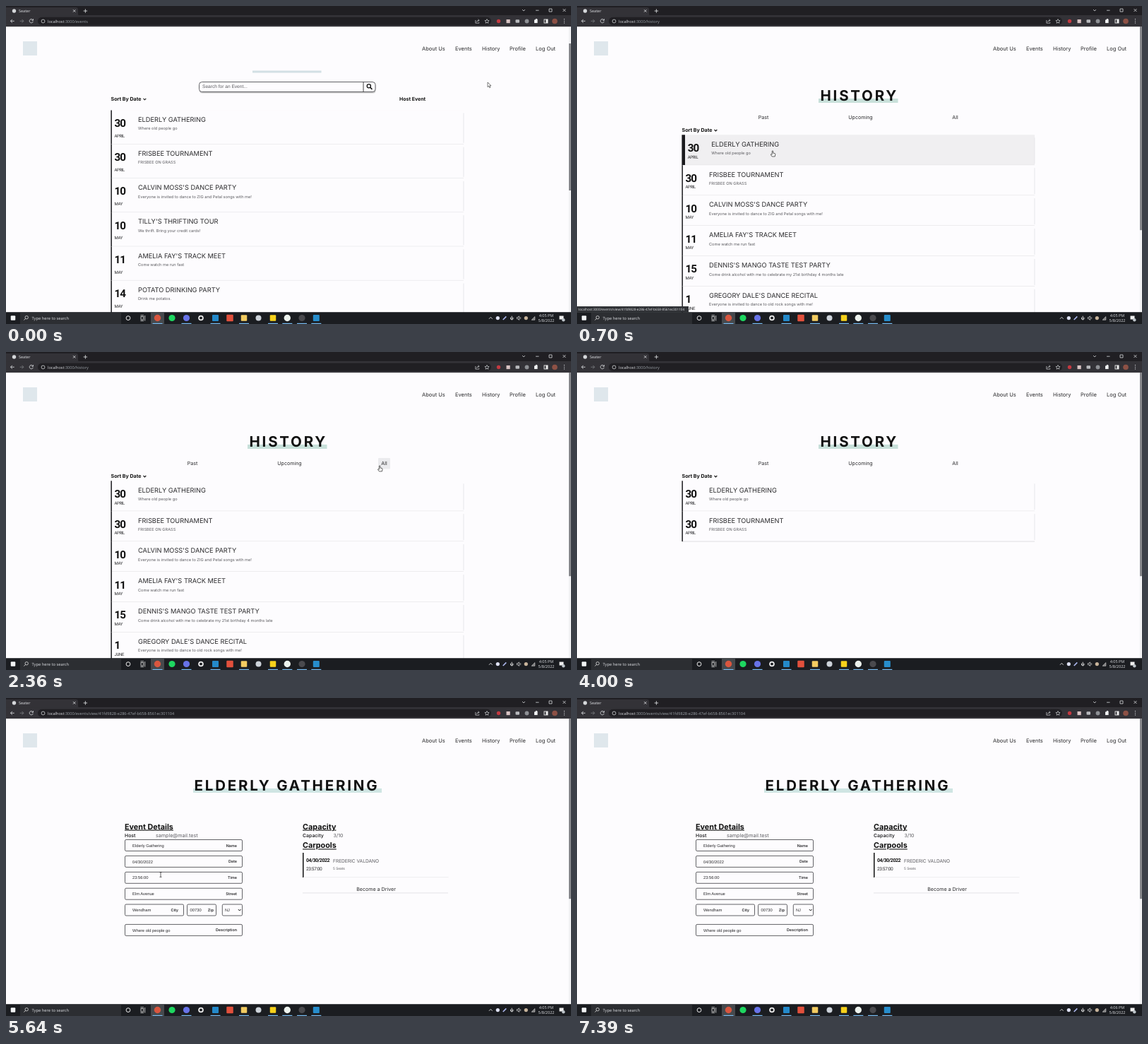
Recreate the animation shown at these times as an HTML page. Size 800 px wide and 450 px high, loop 7510 ms.

```html
<!DOCTYPE html>
<html lang="en">
<head>
<meta charset="utf-8">
<title>Seater</title>
<style>
  html, body { margin: 0; width: 100%; height: 100%; overflow: hidden; background: #fdfcfe; }
  svg { display: block; width: 800px; height: 450px; }
  text { font-family: Inter, sans-serif; fill: #2a2a2c; text-rendering: geometricPrecision; white-space: pre; }
  .bold { font-weight: 700; fill: #111; }
  .semi { font-weight: 600; }
  .soft { fill: #5c5c60; }
  .head { font-weight: 700; fill: #111; letter-spacing: 2.8px; }
  .line { font-weight: 700; fill: #111; text-decoration: underline; }
  .narrow { font-family: Roboto, sans-serif; letter-spacing: -.06em; }
  .form { font-family: "Liberation Sans", sans-serif; }
  .ui { font-family: "Open Sans", sans-serif; fill: #dfe1e5; }
  .end { text-anchor: end; }
  .mid { text-anchor: middle; }
</style>
</head>
<body>
<svg viewBox="0 0 800 450">
  <g id="page"></g>
  <g id="frame"></g>
  <g id="live"></g>
  <g id="cursor"></g>
</svg>
<script>
const LOOP = 7510;
const PAPER = '#fdfcfe';
const $ = id => document.getElementById(id);

const text = (x, y, size, cls, str) =>
  `<text x="${x}" y="${y}" font-size="${size}" class="${cls}">${str}</text>`;
const rect = (x, y, w, h, fill, more = '') =>
  `<rect x="${x}" y="${y}" width="${w}" height="${h}" fill="${fill}" ${more}/>`;
const dot = (x, y, r, fill, more = '') =>
  `<circle cx="${x}" cy="${y}" r="${r}" fill="${fill}" ${more}/>`;
const path = (d, stroke, width = 1, fill = 'none') =>
  `<path d="${d}" stroke="${stroke}" stroke-width="${width}" fill="${fill}"/>`;
const box = (x, y, w, h, r = 1.6) =>
  rect(x, y, w, h, PAPER, `rx="${r}" stroke="#3c3c40" stroke-width=".8"`);

const elderly = [30, 'APRIL', 'ELDERLY GATHERING', 'Where old people go'];
const frisbee = [30, 'APRIL', 'FRISBEE TOURNAMENT', 'FRISBEE ON GRASS'];
const dance = [10, 'MAY', "CALVIN MOSS'S DANCE PARTY", 'Everyone is invited to dance to ZIG and Petal songs with me!'];
const thrift = [10, 'MAY', "TILLY'S THRIFTING TOUR", 'We thrift. Bring your credit cards!'];
const track = [11, 'MAY', "AMELIA FAY'S TRACK MEET", 'Come watch me run fast'];
const potato = [14, 'MAY', 'POTATO DRINKING PARTY', 'Drink me potatos.'];
const mango = [15, 'MAY', "DENNIS'S MANGO TASTE TEST PARTY", 'Come drink alcohol with me to celebrate my 21st birthday 4 months late'];
const recital = [1, 'JUNE', "GREGORY DALE'S DANCE RECITAL", 'Everyone is invited to dance to old rock songs with me!'];
const upcomingEvents = [elderly, frisbee, dance, thrift, track, potato];
const pastEvents = [elderly, frisbee];
const allEvents = [elderly, frisbee, dance, track, mango, recital];

const links = [['About Us', 589, 33], ['Events', 636, 25], ['History', 674, 26], ['Profile', 713, 24], ['Log Out', 750, 30]];
const filters = [['Past', 264, 11], ['Upcoming', 401.5, 22], ['All', 535.5, 8.5]];
const host = 'localhost:3000';
const viewPath = '/events/view/41fd9828-e286-47ef-b658-8561ec301104';

function list(events, top, pitch, monthY, hover) {
  return events.map(([day, month, title, about], i) => {
    const y = top + i * pitch, on = hover === i, x = on ? 3.3 : 0;
    return rect(149, y, 499, pitch, on ? '#f0eff1' : PAPER)
      + rect(149, y + pitch - .6, 499, 1.2, '#e4e4e7')
      + rect(647.4, y + 4, 1, pitch - 6, '#e6e6ea')
      + rect(148.4, y, on ? 4.6 : 1.5, pitch, '#1a1a1d')
      + text(153.5 + x, y + 23.5, 15.2, 'narrow bold', day)
      + text(153.5 + x, y + monthY, 6, 'narrow', month)
      + text(187 + x, y + 16.3, 9.25, '', title)
      + text(187 + x, y + 27.6, 5.65, 'soft', about);
  }).join('');
}

const sortBy = y => text(148.5, y, 7.1, 'bold', 'Sort By Date')
  + path(`M194.5 ${y - 3.4}l1.9 1.9l1.9 -1.9`, '#111', 1.1);

function eventsPage() {
  return rect(349, 91.5, 97.5, 3, '#d2e0e4')
    + rect(274, 108.5, 249.5, 15, '#ccc', 'rx="4"') + box(273.5, 107.5, 249.5, 14, 4)
    + path('M506 107.5v14', '#333', .9)
    + text(278, 116.4, 6.6, 'form soft', 'Search for an Event...')
    + dot(513.8, 113.3, 2.6, 'none', 'stroke="#111" stroke-width="1.3"')
    + path('M515.7 115.2l2.7 2.7', '#111', 1.5)
    + sortBy(134.3) + text(557, 134.3, 7, 'bold', 'Host Event')
    + list(upcomingEvents, 147.5, 48.2, 38.2);
}

function historyPage(events, hover) {
  return rect(342, 131, 112.5, 6, '#c8e0da') + text(344.5, 133.5, 20.5, 'head', 'HISTORY')
    + filters.map(([name, x, half]) =>
        (hover === name ? rect(x - half, 150, half * 2, 15.5, '#ebebee', 'rx="1"') : '')
        + text(x, 160.2, 7.1, 'mid', name)).join('')
    + sortBy(178.4) + list(events, 182.3, 42.9, 33.2, hover);
}

function field(x, y, w, value, label) {
  const wide = w > 50;
  return box(x + .5, y, w - 1, 16) + text(x + (wide ? 11 : 4.5), y + 10.1, 5.8, 'form', value)
    + text(x + w - (wide ? 8 : 4), y + 10, 5.4, 'semi end', label);
}

function detailPage() {
  return rect(265, 128, 267, 6, '#cfe5e3') + text(266.5, 130.7, 20.5, 'head', 'ELDERLY GATHERING')
    + text(168, 185.6, 10.8, 'line', 'Event Details')
    + text(168, 196.5, 6.9, 'semi', 'Host') + text(212, 196.5, 7.15, 'soft', 'sample@mail.test')
    + field(168, 200.5, 167, 'Elderly Gathering', 'Name')
    + field(168, 223.4, 167, '04/30/2022', 'Date')
    + field(168, 246.3, 167, '23:56:00', 'Time')
    + field(168, 269.2, 167, 'Elm Avenue', 'Street')
    + field(168, 292, 84, 'Wendham', 'City')
    + field(256, 292, 42, '00730', 'Zip')
    + box(306.3, 292, 28.2, 16) + text(310, 302, 5.6, 'form', 'NJ')
    + path('M328.8 299l1.9 2l1.9 -2', '#111', 1)
    + field(168, 320.4, 167, 'Where old people go', 'Description')
    + text(420, 185.6, 10.8, 'line', 'Capacity')
    + text(420, 196.5, 6.9, 'semi', 'Capacity') + text(463.5, 196.5, 6.9, 'soft', '3/10')
    + text(420, 212.4, 10.8, 'line', 'Carpools')
    + rect(420, 219, 1.5, 35, '#111') + rect(421.5, 253, 205, 1.2, '#f0f0f2')
    + text(425, 232.2, 7, 'narrow bold', '04/30/2022')
    + text(425, 243.8, 6.6, 'narrow', '23:57:00')
    + text(463, 232.5, 6.6, 'soft', 'FREDERIC VALDANO') + text(463, 242.6, 4.8, 'soft', '5 Seats')
    + text(524, 273.4, 7.1, 'mid', 'Become a Driver') + rect(420, 275, 206, 1.6, '#ededf0');
}

function browserFrame() {
  const pale = '#d5d7da', bar = '#333237', lit = x => rect(x - 7, 448.8, 14, 1.2, '#76b9ed');
  const square = (x, c, s = 9) => rect(x - s / 2, 441.5 - s / 2, s, s, c, 'rx="1"');
  return rect(0, 0, 800, 13.5, '#201f23') + rect(0, 13, 800, 16.2, bar)
    + path('M0 13.5V2H99q3 0 3 3v6q0 2.5 2.5 2.5z', 'none', 0, bar)
    + dot(11.5, 7, 2.7, pale) + text(18, 9.2, 5.5, 'ui', 'Seater')
    + path('M95 5.2l3.4 3.4m0 -3.4l-3.4 3.4M109.7 7h5.4m-2.7 -2.7v5.4', pale, .9)
    + path('M731 5l2 2l2 -2M750 6.2h4.5M769 4h4v4h-4zM788.5 4l4 4m0 -4l-4 4', pale, .8)
    + path('M11.7 21.3H6.5m2.4 -2.4l-2.4 2.4l2.4 2.4', pale, .9)
    + path('M19.7 21.3h5.2m-2.4 -2.4l2.4 2.4l-2.4 2.4', '#77797d', .9)
    + path('M38 19.8a2.6 2.6 0 1 0 .3 2.2M38.5 18.3v2h-2', pale, .9)
    + rect(45, 15.8, 642, 11.2, '#201f23', 'rx="5.6"')
    + dot(52.5, 21.5, 2.4, 'none', `stroke="${pale}" stroke-width=".8"`)
    + path('M664.8 20v4.2h5V23m-3.4 -.3q.4 -2.4 3.6 -2.4m-1.6 -1.5l1.7 1.5l-1.7 1.5', pale, .7)
    + path('M681 18.5l.9 2l2.2 .2l-1.7 1.5l.5 2.1l-1.9 -1.1l-1.9 1.1l.5 -2.1l-1.7 -1.5l2.2 -.2z', pale, .7)
    + dot(697.5, 21.5, 2.7, '#c33940') + rect(708.5, 19, 5.2, 5.2, '#d9c4c4')
    + rect(721.5, 19.3, 5.5, 4.5, '#b9bbbe', 'rx="1"') + dot(737.5, 21.5, 2.9, '#8e9195')
    + rect(748, 19.5, 4.6, 4.6, '#f1f3f4') + dot(751, 19.3, 1.4, '#f1f3f4')
    + rect(762, 19, 5, 5, 'none', 'stroke="#eee" stroke-width=".9"') + rect(764.5, 19, 2.5, 5, '#eee')
    + dot(777, 21.5, 3.8, '#8d5145')
    + [18.7, 21.3, 23.9].map(y => dot(790.5, y, .65, pale)).join('')
    + rect(0, 433.2, 800, 17, '#1b1d21')
    + square(10, '#f1f3f4', 6.5)
    + rect(20, 433.8, 143, 16.2, '#2c2e32')
    + dot(29.2, 440.7, 2.2, 'none', 'stroke="#ddd" stroke-width=".8"') + path('M27.6 442.3l-2.2 2.2', '#ddd', .9)
    + text(36.5, 443.9, 5.75, 'ui', 'Type here to search')
    + dot(173, 441.6, 2.9, 'none', 'stroke="#eee" stroke-width="1"')
    + rect(191, 439.5, 3.7, 4.3, 'none', 'stroke="#ddd" stroke-width=".8"')
    + path('M190.5 437.7h4.5M190.5 445.5h4.5M196.7 438v7.5', '#ddd', .8)
    + rect(205, 433.2, 19, 16.8, '#46494d')
    + dot(214.5, 441.5, 4.7, '#d9563f') + dot(235, 441.5, 4.6, '#1ed760')
    + dot(255.5, 441.5, 4.6, '#6873e8') + dot(276, 441.5, 2.9, 'none', 'stroke="#eee" stroke-width="1.8"')
    + square(296.5, '#2489ca') + square(317, '#e2503c', 9.5) + square(337, '#f3cc61', 8.5)
    + dot(357.5, 441.5, 4, '#cdd3da') + square(378, '#f7d21b', 8.5) + dot(398.3, 441.5, 4.7, '#edf3ee')
    + dot(419, 441.5, 4.6, '#4a4a4e') + square(439.3, '#278dcc')
    + [214.5, 255.5, 296.5, 337, 378, 398.3, 419, 439.3].map(lit).join('')
    + path('M684 442.7l2.3 -2.3l2.3 2.3', '#eee', .9)
    + dot(696.3, 441.6, 2.6, '#dfe2f5') + path('M703.7 444l4.6 -4.6', '#aab5ea', 1.7)
    + path('M716.2 438.7v5m-1.7 -3v2.3q1.7 2 3.4 0v-2.3', '#eee', .9)
    + path('M723.5 440.5h1.2l1.7 -1.7v5.6l-1.7 -1.7h-1.2zM728 440q1.4 1.6 0 3.2', '#eee', .7)
    + dot(736.3, 441.6, 2.6, '#c8b49b') + path('M744.2 444.2l4.6 -4.6v4.6z', '#ccc', .7, '#777')
    + text(765, 447.3, 5.5, 'ui mid', '5/8/2022')
    + rect(783.5, 438.5, 6, 5, '#eee') + dot(789.3, 444.3, 2.2, '#bcc3c8');
}

// Pointer stops: time, x, y. The pointer eases between them.
const stops = [
  [0, 682, 108], [30, 682, 108], [250, 686, 60], [300, 686, 60], [700, 277, 205], [790, 277, 205],
  [1240, 264, 158], [1760, 264, 158], [2330, 529, 161], [2520, 532, 160], [3270, 264, 159],
  [4210, 264, 159], [4700, 236, 204], [4850, 236, 204], [5300, 222, 207], [5470, 222, 207],
  [5640, 219, 250], [5720, 219, 250], [6180, 500, 238], [6300, 505, 245], [6940, 300, 275],
  [7000, 300, 275], [7090, 270, 300], [LOOP, 270, 300]
];
const hidden = [[1250, 1760], [3530, 4210], [7240, LOOP]];

function pointer(t) {
  if (hidden.some(([a, b]) => t >= a && t < b)) return null;
  const i = stops.findIndex(s => s[0] > t), [t0, x0, y0] = stops[i - 1], [t1, x1, y1] = stops[i];
  const p = (t - t0) / (t1 - t0), e = p * p * (3 - 2 * p);
  return { x: x0 + (x1 - x0) * e, y: y0 + (y1 - y0) * e };
}

const shapes = {
  arrow: path('M0 0v6.7l1.6 -1.5l1.1 2.5l1.1 -.5l-1.1 -2.4h2.2z', '#222', .6, '#fff'),
  hand: path('M-.8 .3q.8 -.8 1.5 0v2.8l2.5 .6q.8 .3 .6 1.2l-.6 3.1h-4l-2 -2.8q.3 -1.2 2 0z', '#222', .7, '#fff'),
  beam: path('M-1.5 -3.3h3M0 -3.3v6.6M-1.5 3.3h3', '#222', .7)
};

function hitTest(p, scene, rows) {
  if (!p) return null;
  const link = links.find(([, x, w]) => p.x >= x && p.x <= x + w && Math.abs(p.y - 60) < 6);
  if (link) return link[0];
  if (scene !== 'history') return null;
  const filter = filters.find(([, x, half]) => Math.abs(p.x - x) < half && Math.abs(p.y - 158) < 8);
  if (filter) return filter[0];
  const row = Math.floor((p.y - 182.3) / 42.9);
  return p.x > 148 && p.x < 648 && row >= 0 && row < rows ? row : null;
}

function overField(p) {
  return p.x > 168 && p.x < 335 && p.y > 200 && p.y < 337;
}

let shown = '';
function render(t) {
  const scene = t < 300 ? 'events' : t < 5470 ? 'history' : 'detail';
  const events = t < 3360 ? allEvents : pastEvents;
  const p = pointer(t), hover = hitTest(p, scene, events.length);
  const clock = t < 7000 ? '4:05 PM' : '4:06 PM';
  const key = [scene, events.length, hover, clock].join();
  if (key !== shown) {
    shown = key;
    const body = scene === 'events' ? eventsPage() : scene === 'history' ? historyPage(events, hover) : detailPage();
    const [top, height] = { events: [53, 208], history: [29.2, 288], detail: [29.2, 255] }[scene];
    const isLink = links.some(l => l[0] === hover);
    const status = typeof hover === 'number' ? viewPath : isLink ? '/' + hover.toLowerCase() : '';
    $('page').innerHTML = rect(0, 0, 800, 450, PAPER) + body
      + rect(24, 50, 20, 20, '#dfe7ec')
      + links.map(([name, x]) => text(x, 62.8, 7.5, '', name)).join('')
      + rect(796.8, 29, 3.2, 405, '#f1f1f3') + rect(797, top, 3, height, '#85868a')
      + (status && rect(0, 425, status === viewPath ? 158 : 56, 8.4, '#303236')
        + text(2, 430.9, 4.7, 'ui', host + status));
    const url = scene === 'detail' ? viewPath : '/' + scene;
    $('live').innerHTML = text(59, 23.6, 5.6, 'ui', `${host.split(':')[0]}<tspan fill="#9aa0a6">:3000${url}</tspan>`)
      + text(765, 439.7, 5.5, 'ui mid', clock);
  }
  const cursor = $('cursor');
  cursor.style.display = p ? '' : 'none';
  if (!p) return;
  const shape = hover !== null ? 'hand' : scene === 'detail' && overField(p) ? 'beam' : 'arrow';
  cursor.innerHTML = shapes[shape];
  cursor.setAttribute('transform', `translate(${p.x} ${p.y})`);
}

$('frame').innerHTML = browserFrame();
const start = performance.now();
function tick() {
  render((performance.now() - start) % LOOP);
  requestAnimationFrame(tick);
}
tick();
</script>
</body>
</html>
```
